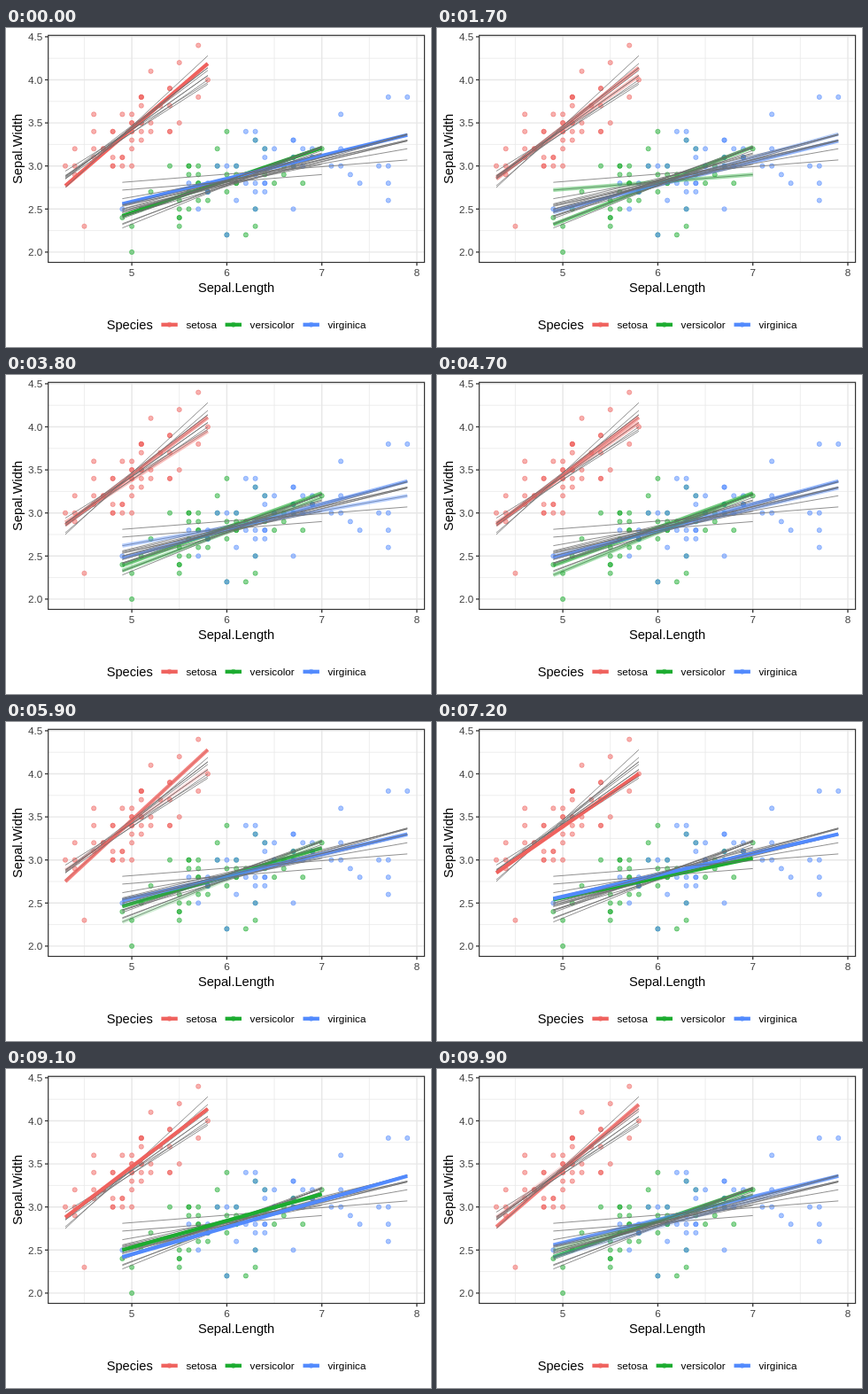
Recreate the animation shown at these times as an HTML page. Size 480x360 px, loop 10 s.

```html
<!DOCTYPE html>
<html lang="en">
<head>
<meta charset="utf-8">
<title>Fitted lines by species</title>
<style>
  html, body { margin: 0; width: 100%; height: 100%; overflow: hidden; background: #fff; }
  svg { display: block; width: 480px; height: 360px; font: 11.73px "Liberation Sans", Arial, sans-serif; }
  .title { font-size: 14.67px; }
  .tick { fill: #404040; }
  .fit { stroke-width: 4.27; stroke-opacity: 0; animation: show 10s linear infinite; }
  /* hold, then fade in five 100 ms steps */
  @keyframes show {
    0% { stroke-opacity: 1; }
    5% { stroke-opacity: 1; animation-timing-function: steps(5, end); }
    10%, 90% { stroke-opacity: 0; }
    95% { stroke-opacity: 0; animation-timing-function: steps(5, end); }
    100% { stroke-opacity: 1; }
  }
</style>
</head>
<body>
<svg id="plot" viewBox="0 0 480 360"></svg>
<script>
const plot = document.getElementById('plot');
const box = { left: 47.7, right: 472.6, top: 8.3, bottom: 264.5 };
const px = v => 142.1 + 107.3 * (v - 5);
const py = v => 252.9 - 97.2 * (v - 2);

function add(parent, tag, attrs, text) {
  const el = document.createElementNS('http://www.w3.org/2000/svg', tag);
  for (const key in attrs) el.setAttribute(key, attrs[key]);
  if (text) el.textContent = text;
  return parent.appendChild(el);
}
const line = (parent, x1, y1, x2, y2, attrs) =>
  add(parent, 'line', { x1, y1, x2, y2, ...attrs });
const label = (x, y, text, attrs) => add(plot, 'text', { x, y, ...attrs }, text);
const dot = (cx, cy, color) => add(plot, 'circle', {
  cx, cy, r: 2.6, fill: color, stroke: color,
  'fill-opacity': 0.5, 'stroke-opacity': 0.5, 'stroke-width': 0.945
});

// points: sepal length -> sepal widths, both in mm
const species = [
  { name: 'setosa', color: '#ef625e', from: 4.3, to: 5.8, keyX: 173.1, points: {
    43: [30], 44: [29, 30, 32], 45: [23], 46: [31, 34, 36, 32], 47: [32, 32],
    48: [34, 30, 34, 31, 30], 49: [30, 31, 31, 36], 50: [36, 34, 30, 34, 32, 35, 35, 33],
    51: [35, 35, 38, 37, 33, 34, 38, 38], 52: [35, 34, 41], 53: [37],
    54: [39, 37, 39, 34, 34], 55: [42, 35], 57: [44, 38], 58: [40] } },
  { name: 'versicolor', color: '#1cac30', from: 4.9, to: 7, keyX: 245.3, points: {
    49: [24], 50: [20, 23], 51: [25], 52: [27], 54: [30], 55: [23, 24, 24, 25, 26],
    56: [29, 30, 25, 30, 27], 57: [28, 26, 30, 29, 28], 58: [27, 27, 26], 59: [30, 32],
    60: [22, 29, 27, 34], 61: [29, 28, 28, 30], 62: [22, 29], 63: [33, 25, 23],
    64: [32, 29], 65: [28], 66: [29, 30], 67: [31, 30, 31], 68: [28], 69: [31], 70: [32] } },
  { name: 'virginica', color: '#528afd', from: 4.9, to: 7.9, keyX: 333.2, points: {
    49: [25], 56: [28], 57: [25], 58: [27, 28, 27], 59: [30], 60: [22, 30], 61: [30, 26],
    62: [28, 34], 63: [33, 29, 27, 28, 34, 25], 64: [27, 32, 28, 28, 31],
    65: [30, 32, 30, 30], 67: [25, 33, 31, 33, 30], 68: [30, 32], 69: [32, 31, 31],
    71: [30], 72: [36, 32, 30], 73: [29], 74: [28], 76: [30], 77: [38, 26, 28, 30], 79: [38] } }
];

// one row per draw: start and end height of each species' line
const draws = [
  [[2.77, 4.19], [2.42, 3.21], [2.56, 3.36]],
  [[2.85, 4.14], [2.32, 3.22], [2.48, 3.29]],
  [[2.87, 4.05], [2.72, 2.90], [2.46, 3.37]],
  [[2.89, 3.95], [2.33, 3.18], [2.62, 3.20]],
  [[2.86, 4.11], [2.39, 3.23], [2.48, 3.37]],
  [[2.88, 4.05], [2.28, 3.22], [2.50, 3.29]],
  [[2.75, 4.28], [2.46, 3.14], [2.53, 3.30]],
  [[2.85, 4.00], [2.54, 3.02], [2.55, 3.30]],
  [[2.94, 3.97], [2.41, 3.21], [2.81, 3.07]],
  [[2.88, 4.14], [2.50, 3.15], [2.42, 3.36]]
];

function drawGrid() {
  const grid = (width, xs, ys) => {
    const attrs = { stroke: '#e7e7e7', 'stroke-width': width };
    ys.forEach(v => line(plot, box.left, py(v), box.right, py(v), attrs));
    xs.forEach(v => line(plot, px(v), box.top, px(v), box.bottom, attrs));
  };
  grid(0.71, [4.5, 5.5, 6.5, 7.5], [2.25, 2.75, 3.25, 3.75, 4.25]);
  grid(1.42, [5, 6, 7, 8], [2, 2.5, 3, 3.5, 4, 4.5]);
}

function drawPoints() {
  for (const { color, points } of species)
    for (const x in points)
      points[x].forEach(y => dot(px(x / 10), py(y / 10), color));
}

function drawLines() {
  draws.forEach((ends, i) => {
    const trace = add(plot, 'g', { stroke: '#6d6d6d', 'stroke-width': 0.75 });
    const fit = add(plot, 'g', { class: 'fit', style: `animation-delay: ${i ? i - 10 : 0}s` });
    species.forEach(({ color, from, to }, s) => {
      const at = [px(from), py(ends[s][0]), px(to), py(ends[s][1])];
      line(trace, ...at);
      line(fit, ...at, { stroke: color });
    });
  });
}

function drawAxes() {
  add(plot, 'rect', {
    x: box.left, y: box.top, width: box.right - box.left, height: box.bottom - box.top,
    fill: 'none', stroke: '#333', 'stroke-width': 1.2
  });
  const mark = { stroke: '#333', 'stroke-width': 1.3 };
  for (let v = 2; v <= 4.5; v += 0.5) {
    line(plot, box.left - 3.7, py(v), box.left, py(v), mark);
    label(41.2, py(v) + 4.2, v.toFixed(1), { class: 'tick', 'text-anchor': 'end' });
  }
  for (let v = 5; v <= 8; v++) {
    line(plot, px(v), box.bottom, px(v), box.bottom + 3.7, mark);
    label(px(v), 279.6, String(v), { class: 'tick', 'text-anchor': 'middle' });
  }
  const title = { class: 'title', 'text-anchor': 'middle' };
  label(260.1, 298, 'Sepal.Length', title);
  label(0, 0, 'Sepal.Width', { ...title, transform: 'translate(18 136.4) rotate(-90)' });
}

function drawLegend() {
  label(113.7, 340.2, 'Species', { class: 'title' });
  for (const { name, color, keyX } of species) {
    dot(keyX + 11.5, 334.8, color);
    line(plot, keyX + 2.3, 334.8, keyX + 20.7, 334.8, { stroke: color, 'stroke-width': 4.27 });
    label(keyX + 30.3, 339, name);
  }
}

drawGrid();
drawPoints();
drawLines();
drawAxes();
drawLegend();
</script>
</body>
</html>
```
